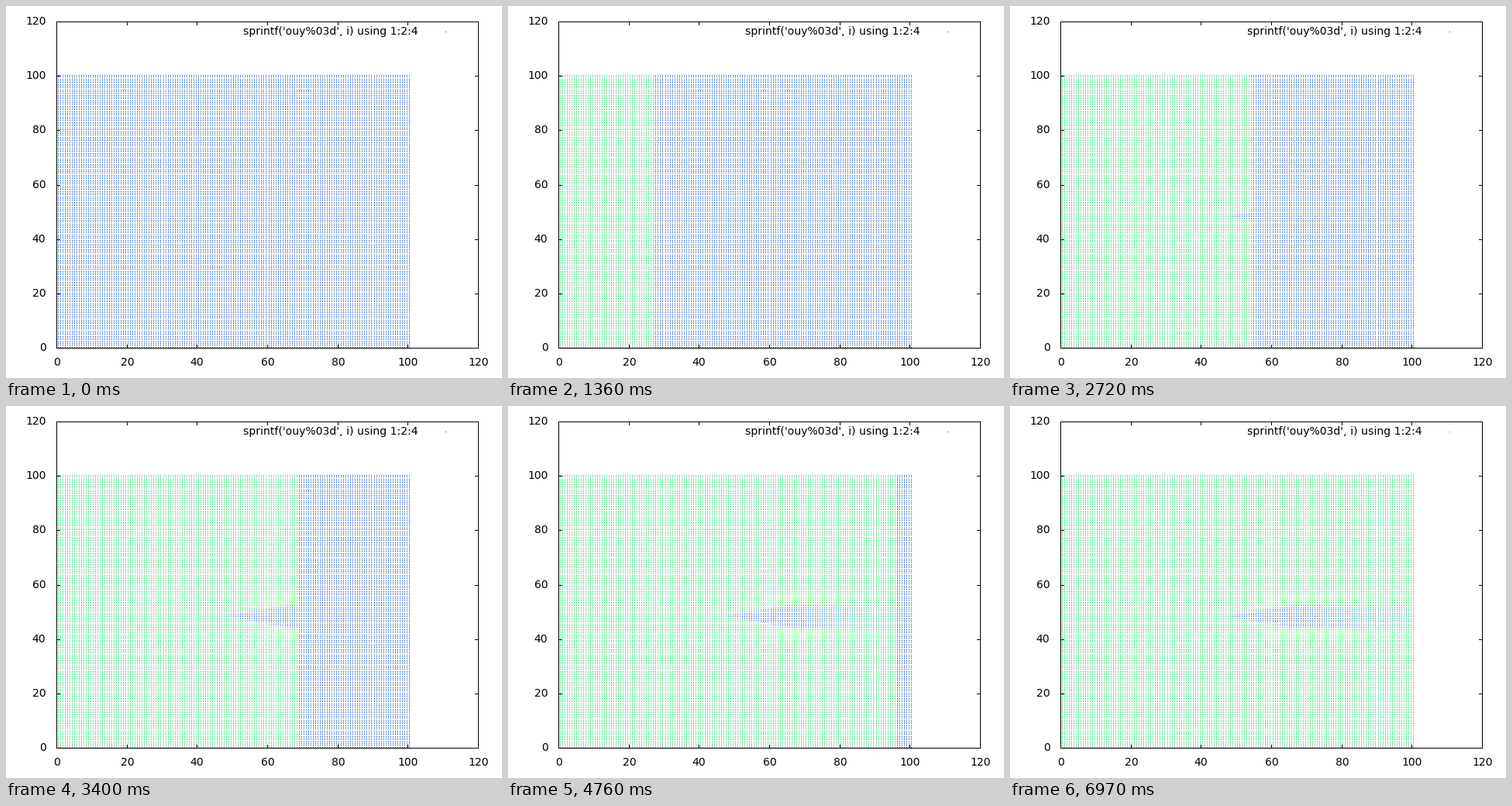
These frames come from a looping animation (640 by 480 pixels, 7.14 s). A matplotlib script:

```python
import numpy as np
import matplotlib.pyplot as plt
from matplotlib.animation import FuncAnimation
from matplotlib.patches import Rectangle

W, H, DPI = 640, 480, 100
LEFT, RIGHT, TOP, BOTTOM = 65, 609, 20, 441
FRAMES, INTERVAL = 42, 170
SPEED = 3.42                      # front travel per frame, in axis units
NOSE, TAIL, MID = 47, 66, 48.6    # wedge-shaped obstacle

fig = plt.figure(figsize=(W / DPI, H / DPI), dpi=DPI, facecolor="white")
ax = fig.add_axes([0, 0, 1, 1])
ax.axis("off")


def to_px(x):
    return LEFT + x * (RIGHT - LEFT) / 120


def to_py(y):
    return BOTTOM - y * (BOTTOM - TOP) / 120


def nearest(v):
    return np.floor(np.asarray(v) + 0.5).astype(int)


def bar(x, y, w, h):
    ax.add_patch(Rectangle((x, y), w, h, fc="black", lw=0, zorder=2))


def label(x, y, text, ha):
    ax.text(x, y, text, ha=ha, va="baseline", color="black",
            family="DejaVu Sans", size=14 * 72 / DPI)


# Grid of sample points, one pixel each
coords = (2 * np.arange(151) + 1) / 3
X, Y = np.meshgrid(coords, coords)
cols = nearest(to_px(X))
rows = BOTTOM - nearest(BOTTOM - to_py(Y))

STOPS = [0, 0.5, 1, 1.25]
SHADES = np.array([(0, 70, 160), (0, 140, 145), (0, 204, 90), (60, 245, 70)])


def shade(u):
    return np.stack([np.interp(u, STOPS, c) for c in SHADES.T], axis=-1)


def flow(n):
    """Flow speed on the grid: a moving front, an obstacle and its wake."""
    half = 4 * np.clip((X - NOSE) / (TAIL - NOSE), 0, 1)
    dist = np.abs(Y - MID)
    reach = 10 + 0.7 * max(n - 20, 0)
    lag = np.exp(-np.clip(X - TAIL - 4, 0, None) / reach)
    inside = np.clip((half - dist) / 0.7 + 0.5, 0, 1) * (X > NOSE)
    fringe = np.exp(-((dist - half - 2.5) / 2.2) ** 2)
    fringe *= np.clip((X - NOSE - 3) / 12, 0, 1) * lag
    u = 1 + 0.22 * fringe * (1 - inside) - 0.97 * inside * lag
    return np.where(X <= SPEED * n, u, 0)


def picture(n):
    img = np.full((H, W, 3), 255, np.uint8)
    colours = shade(flow(n))
    img[rows, cols] = colours
    img[33, 567] = colours[-1, -1]
    return img


dots = ax.imshow(picture(0), extent=(0, W, H, 0), interpolation="nearest",
                 aspect="auto", zorder=1)
ax.set(xlim=(0, W), ylim=(H, 0))

for y in (TOP, BOTTOM):
    bar(LEFT, y, RIGHT - LEFT + 1, 1)
for x in (LEFT, RIGHT):
    bar(x, TOP, 1, BOTTOM - TOP + 1)

for v in range(0, 121, 20):
    px, py = int(nearest(to_px(v))), int(nearest(to_py(v)))
    bar(px, TOP, 1, 5)
    bar(px, BOTTOM - 4, 1, 5)
    bar(LEFT, py, 5, 1)
    bar(RIGHT - 4, py, 5, 1)
    label(px + 0.5, 464, str(v), "center")
    label(51.5, py + 4, str(v), "right")

label(532, 37, "sprintf('ouy%03d', i) using 1:2:4", "right")


def update(n):
    dots.set_data(picture(n))
    return [dots]


anim = FuncAnimation(fig, update, frames=FRAMES, interval=INTERVAL,
                     repeat=True, repeat_delay=0, blit=False)
plt.show()
```
